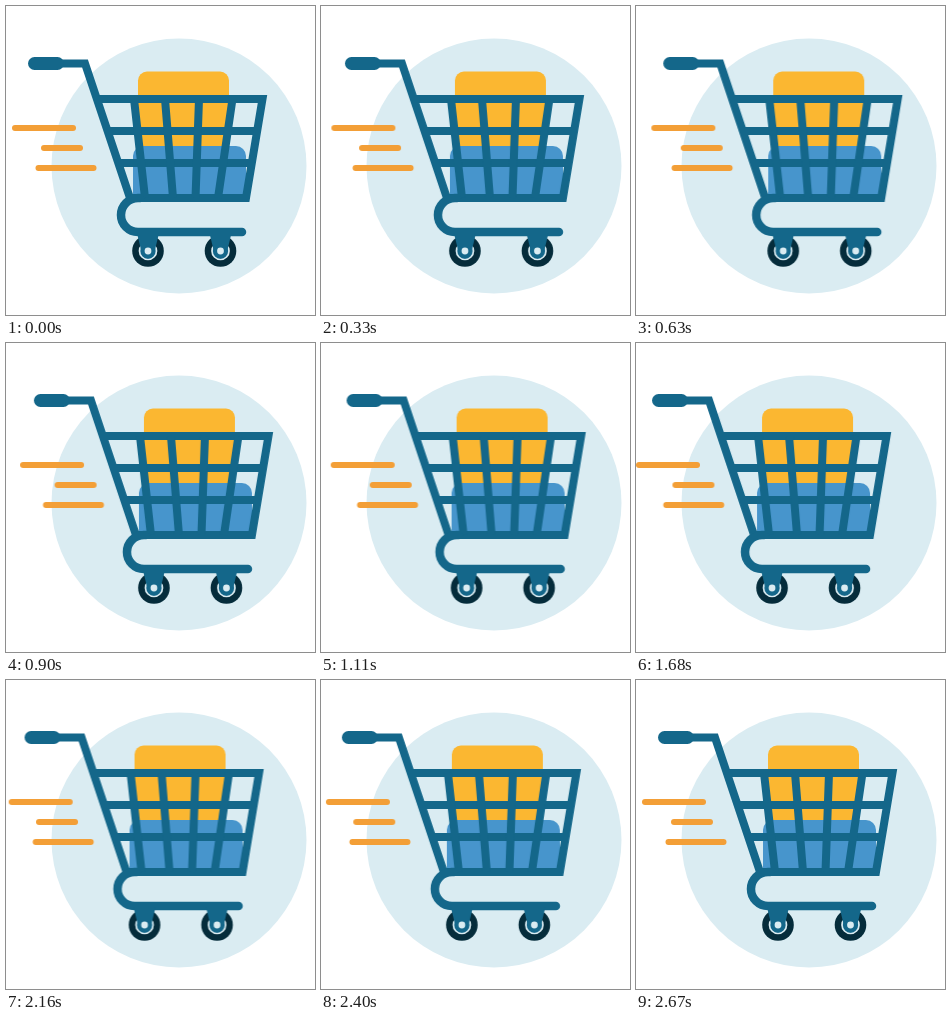
These frames come from a looping animation (309 by 309 pixels, 2.7 s). An HTML page without scripts:

```html
<!DOCTYPE html>
<html lang="en">
<head>
<meta charset="utf-8">
<title>Rolling shopping cart</title>
<style>
  html, body { margin: 0; width: 100%; height: 100%; overflow: hidden; background: #fff; }
  svg { display: block; width: 100%; height: 100%; }

  .frame { fill: none; stroke: #14678a; stroke-width: 8; }
  .speed { stroke: #f39f37; stroke-width: 6; stroke-linecap: round; }

  .cart, .speed { animation: 2700ms ease-in-out infinite; }
  .cart { animation-name: roll; }
  .top { animation-name: top; }
  .middle { animation-name: middle; }
  .bottom { animation-name: bottom; }

  @keyframes roll {
    31.1% { transform: translateX(6px); }
    63.3% { transform: translateX(-6px); }
  }
  @keyframes top {
    25.6% { transform: translateX(9.5px); }
    62.2% { transform: translateX(-6px); }
  }
  @keyframes middle {
    37.8% { transform: translateX(14px); }
    78.9% { transform: translateX(-5px); }
  }
  @keyframes bottom {
    33.3% { transform: translateX(7.5px); }
    71.1% { transform: translateX(-3.5px); }
  }
</style>
</head>
<body>
<svg viewBox="0 0 309 309">
  <defs>
    <g id="wheel">
      <circle r="15.8" fill="#052c3b"/>
      <circle r="8.5" fill="#14678a" stroke="#daecf2" stroke-width="1.7"/>
      <path d="M-11-18H11L6.5 1A6.5 6.5 0 0 1-6.5 1Z" fill="#14678a"/>
      <circle r="3.4" fill="#daecf2"/>
    </g>
  </defs>

  <circle cx="173" cy="160" r="127.5" fill="#daecf2"/>

  <path class="speed top" d="M9 122H67"/>
  <path class="speed middle" d="M38 142H74"/>
  <path class="speed bottom" d="M32.5 162H87.5"/>

  <g class="cart">
    <rect x="132" y="65.5" width="91" height="90" rx="9" fill="#fbb731"/>
    <path d="M127 190V150a10 10 0 0 1 10-10H230a10 10 0 0 1 10 10V190Z" fill="#4795cc"/>

    <g class="frame">
      <path d="M50 57.5H79L124 192H240L256.500 93H91"/>
      <path d="M102 125H251M113 157H246"/>
      <path d="M128 93L139 192M159 93L167 192M193 93L189.500 192M226.500 93L212 192"/>
      <path d="M134 192H132a17 17 0 0 0 0 34H236" stroke-width="8.500" stroke-linecap="round"/>
    </g>
    <rect x="22" y="51" width="36" height="13" rx="6.500" fill="#14678a"/>

    <use href="#wheel" x="142" y="245"/>
    <use href="#wheel" x="214.500" y="245"/>
  </g>
</svg>
</body>
</html>
```
